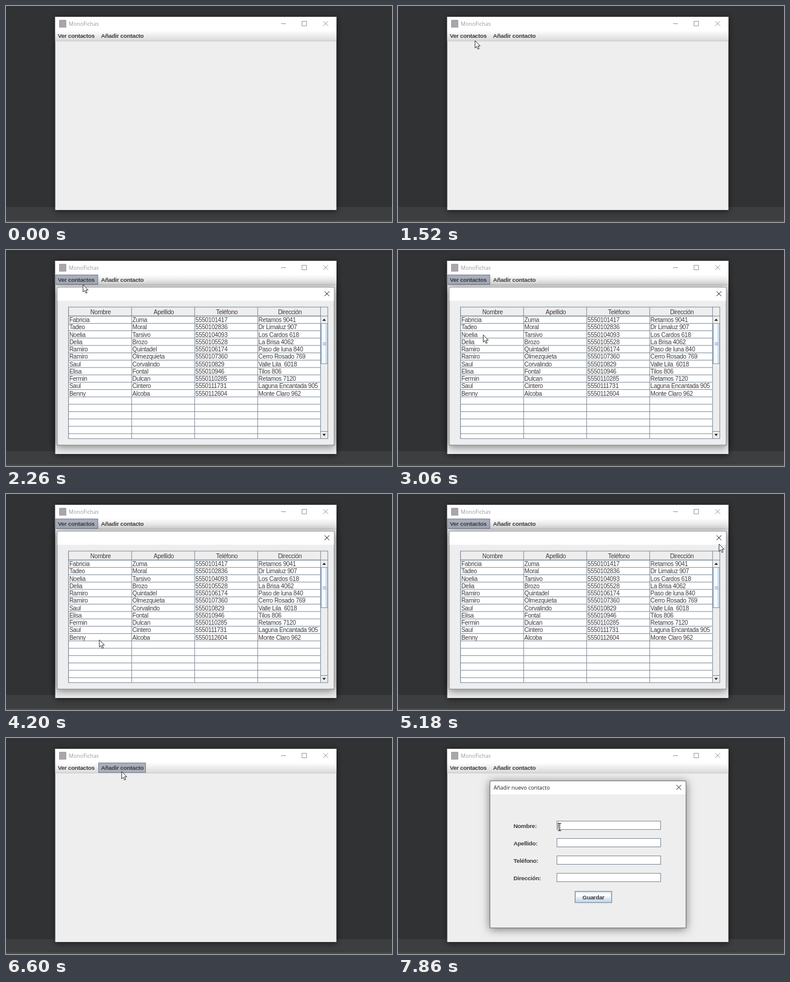
These frames come from a looping animation (640 px wide and 360 px high, 8 s). An HTML page with a canvas:

```html
<!DOCTYPE html>
<html lang="es">
<head>
<meta charset="utf-8">
<title>Agenda</title>
<style>
  html, body { margin: 0; width: 100%; height: 100%; overflow: hidden; background: #313234; }
  canvas { display: block; width: 100vw; height: 100vh; }
</style>
</head>
<body>
<canvas id="stage" width="640" height="360"></canvas>
<script>
const ctx = document.getElementById('stage').getContext('2d');
const LOOP = 8000;
const GRID = '#7f8e9d', PANEL = '#eeeeee', INK = '#3f3b3c';
const SANS = '"Liberation Sans", Arial, sans-serif';
const PLAIN = '10px ' + SANS, BOLD = 'bold 9.8px ' + SANS;
const TITLE = '8.9px "Open Sans", "Noto Sans", sans-serif';

const HEADERS = ['Nombre', 'Apellido', 'Teléfono', 'Dirección'];
const CONTACTS = [
  ['Fabricia', 'Zuma', '5550101417', 'Retamos 9041'],
  ['Tadeo', 'Moral', '5550102836', 'Dr Limaluz 907'],
  ['Noelia', 'Tarsivo', '5550104093', 'Los Cardos 618'],
  ['Delia', 'Brozo', '5550105528', 'La Brisa 4062'],
  ['Ramiro', 'Quintadel', '5550106174', 'Paso de luna 840'],
  ['Ramiro', 'Olmezquieta', '5550107360', 'Cerro Rosado 769'],
  ['Saul', 'Corvalindo', '555010829', 'Valle Lila  6018'],
  ['Elisa', 'Fontal', '555010946', 'Tilos 806'],
  ['Fermin', 'Dulcan', '5550110285', 'Retamos 7120'],
  ['Saul', 'Cintero', '5550111731', 'Laguna Encantada 905'],
  ['Benny', 'Alcoba', '5550112604', 'Monte Claro 962']
];

// Pointer path: time, x, y
const PATH = [
  [380, 11, 310], [540, 130, 164], [720, 130, 164], [1080, 146, 122], [1500, 127.5, 57.5],
  [2400, 127.5, 57.5], [2740, 130, 99], [3060, 141, 141], [3560, 153, 211], [3660, 157, 215],
  [3960, 157, 215], [4150, 146, 235], [4350, 230, 262], [4760, 524, 112], [5000, 532, 83],
  [5200, 532, 83], [5400, 533, 75], [5620, 533, 75], [5900, 430, 62], [6340, 191.5, 55.5],
  [6640, 191.5, 55.5], [7240, 246, 127], [7420, 258, 143], [7560, 268, 148], [LOOP, 268, 148]
];

const clamp = v => Math.max(0, Math.min(1, v));

// Monotone cubic interpolation, so holds stay still and nothing overshoots
function pathValue(i, u, axis) {
  const slope = k => k < 0 || k > PATH.length - 2 ? 0
    : (PATH[k + 1][axis] - PATH[k][axis]) / (PATH[k + 1][0] - PATH[k][0]);
  const tangent = k => {
    const a = slope(k - 1), b = slope(k);
    return a * b <= 0 ? 0 : 2 * a * b / (a + b);
  };
  const span = PATH[i + 1][0] - PATH[i][0], p = PATH[i][axis], q = PATH[i + 1][axis];
  const ease = u * u * (3 - 2 * u);
  return p + (q - p) * ease
    + span * u * (1 - u) * (tangent(i) * (1 - u) - tangent(i + 1) * u);
}

function pointerAt(t) {
  const i = PATH.findIndex((p, k) => k < PATH.length - 1 && t >= p[0] && t < PATH[k + 1][0]);
  if (i < 0) return null;
  const u = (t - PATH[i][0]) / (PATH[i + 1][0] - PATH[i][0]);
  return [pathValue(i, u, 1), pathValue(i, u, 2)];
}

function rect(x, y, w, h, fill) {
  ctx.fillStyle = fill;
  ctx.fillRect(x, y, w, h);
}

function box(x, y, w, h, fill, stroke) {
  rect(x, y, w, h, fill);
  ctx.strokeStyle = stroke;
  ctx.lineWidth = 1;
  ctx.strokeRect(x + .5, y + .5, w - 1, h - 1);
}

function text(str, x, y, font, color = INK, align = 'left') {
  ctx.font = font;
  ctx.letterSpacing = font === TITLE ? '0px' : '-0.25px';
  ctx.fillStyle = color;
  ctx.textAlign = align;
  ctx.fillText(str, x, y);
}

function line(color, width, ...points) {
  ctx.strokeStyle = color;
  ctx.lineWidth = width;
  ctx.beginPath();
  points.forEach(([x, y]) => ctx.lineTo(x, y));
  ctx.stroke();
}

function polygon(fill, ...points) {
  ctx.fillStyle = fill;
  ctx.beginPath();
  points.forEach(([x, y]) => ctx.lineTo(x, y));
  ctx.closePath();
  ctx.fill();
}

function gradient(x0, y0, x1, y1, ...colors) {
  const g = ctx.createLinearGradient(x0, y0, x1, y1);
  colors.forEach((c, i) => g.addColorStop(i / (colors.length - 1), c));
  return g;
}

function shadowed(x, y, w, h, blur, alpha) {
  ctx.save();
  ctx.shadowColor = `rgba(0,0,0,${alpha})`;
  ctx.shadowBlur = blur;
  ctx.shadowOffsetY = 2;
  rect(x, y, w, h, PANEL);
  ctx.restore();
}

function cross(x, y, r, color) {
  line(color, 1, [x - r, y - r], [x + r, y + r]);
  line(color, 1, [x - r, y + r], [x + r, y - r]);
}

function drawMainWindow(menu) {
  const left = 81.6, width = 466.2;
  rect(0, 0, 640, 360, '#313234');
  rect(0, 335, 640, 25, '#3c3e40');
  rect(0, 358, 640, 1, '#56585a');

  shadowed(left, 18, width, 322, 10, .55);
  rect(left, 18, width, 23, '#fff');
  rect(88, 23, 12, 13, '#a9a5ab');
  text('MonoFichas', 104, 33, TITLE, '#999');
  line('#999', 1, [456, 29.5], [464, 29.5]);
  ctx.strokeRect(490.8, 25.5, 7.5, 7.5);
  cross(530, 29.3, 4, '#999');

  rect(left, 41, width, 17, gradient(0, 41, 0, 58, '#fff', '#dadada'));
  rect(left, 58, width, 1, '#cccccc');
  if (menu === 'view') box(left, 41, 71, 17, '#a8aebb', '#7b8495');
  if (menu === 'add') box(153, 41, 79, 17, '#a8aebb', '#7b8495');
  text('Ver contactos', 86, 53, BOLD);
  text('Añadir contacto', 157.5, 53, BOLD);
}

function drawFrame(x, y, w, h, title) {
  shadowed(x, y, w, h, 14, .5);
  box(x, y, w, h, PANEL, '#73767a');
  rect(x + 1, y + 1, w - 2, 22, '#fff');
  text(title, x + 6.5, y + 15, TITLE, '#222');
  cross(x + w - 12.5, y + 11.3, 4, '#222');
}

function drawContactList() {
  const columns = [103.6, 208.3, 312.8, 417.3], top = 110.1, pitch = 12.25, bottom = 314.3;
  drawFrame(84.4, 61.6, 460.2, 264.1, '');
  rect(104, top, 418, bottom - top, '#fff');

  columns.forEach((x, c) => {
    text(HEADERS[c], x + 53.3, 107, PLAIN, INK, 'center');
    line(GRID, 1, [x, 95], [x, bottom]);
    CONTACTS.forEach((row, r) => text(row[c], x + 1.3, 120.2 + r * pitch, PLAIN));
  });
  for (let y = top; y < bottom; y += pitch) line(GRID, 1, [104, y], [521, y]);

  // Scroll bar
  rect(522, 111, 11, 203, '#eeeeee');
  box(522, 122, 12, 68, gradient(522, 0, 533, 0, '#dbe7f3', '#fff', '#b8cfe5'), '#7d97c4');
  [154.5, 156.5, 158.5].forEach(y => line('#7f9bcb', .8, [525, y], [531, y]));
  polygon('#222', [524.5, 118], [530.5, 118], [527.5, 114.5]);
  polygon('#222', [524.5, 306.5], [530.5, 306.5], [527.5, 310]);
  line(GRID, 1, [522, 302.5], [533, 302.5]);
  line(GRID, 1, [521.6, 95], [521.6, bottom]);
  ctx.strokeRect(103.6, 95.1, 430, bottom - 95.1);
  line(GRID, 1, [104, top], [533, top]);
}

function drawContactForm(focused) {
  drawFrame(152, 71, 326, 246, 'Añadir nuevo contacto');
  HEADERS.forEach((label, i) => {
    const y = 139 + Math.round(i * 29.1);
    text(label + ':', 191.5, y + 10.7, BOLD);
    box(263, y - 1, 173, 15, '#fff', GRID);
  });
  if (focused) line('#333', 1, [265.5, 141], [265.5, 151]);
  box(293, 255, 62, 20, gradient(0, 255, 0, 275, '#dde8f3', '#fff', '#dbe6f1', '#b8cfe5'), GRID);
  ctx.strokeStyle = '#b8cfe5';
  ctx.strokeRect(294.5, 256.5, 59, 17);
  text('Guardar', 324, 268.8, BOLD, INK, 'center');
}

// Fades and grows a dialog about its centre
function withOpening(amount, cx, cy, draw) {
  if (amount <= 0) return;
  const scale = .92 + .08 * amount;
  ctx.save();
  ctx.globalAlpha = amount;
  ctx.translate(cx, cy);
  ctx.scale(scale, scale);
  ctx.translate(-cx, -cy);
  draw();
  ctx.restore();
}

function drawArrow(x, y) {
  ctx.save();
  ctx.translate(x, y);
  ctx.beginPath();
  [[.3, .3], [.3, 12.5], [3, 10], [5, 14.5], [7, 13.6], [5, 9.2], [8.7, 9.2]]
    .forEach(([px, py]) => ctx.lineTo(px, py));
  ctx.closePath();
  ctx.fillStyle = '#fff';
  ctx.fill();
  ctx.strokeStyle = '#222';
  ctx.lineWidth = .9;
  ctx.stroke();
  ctx.restore();
}

function drawTextCursor(x, y) {
  line('#222', 1.1, [x, y - 5], [x, y + 6]);
  [-5.5, 6.5].forEach(dy => line('#222', 1, [x - 2.5, y + dy], [x + 2.5, y + dy]));
}

function render(t) {
  const menu = t >= 1540 && t < 6260 ? 'view' : t >= 6260 && t < 7720 ? 'add' : '';
  drawMainWindow(menu);

  const listShown = Math.min(clamp((t - 1700) / 100), clamp((5740 - t) / 120));
  withOpening(listShown, 315, 194, drawContactList);
  const formShown = clamp((t - 6620) / 100);
  withOpening(formShown, 315, 194, () => drawContactForm(t >= 7720));

  const pointer = pointerAt(t);
  if (!pointer) return;
  const [x, y] = pointer;
  const overField = formShown === 1 && x > 263 && y > 139;
  (overField ? drawTextCursor : drawArrow)(x, y);
}

const start = performance.now();
function tick() {
  render((performance.now() - start) % LOOP);
  requestAnimationFrame(tick);
}
tick();
</script>
</body>
</html>
```
